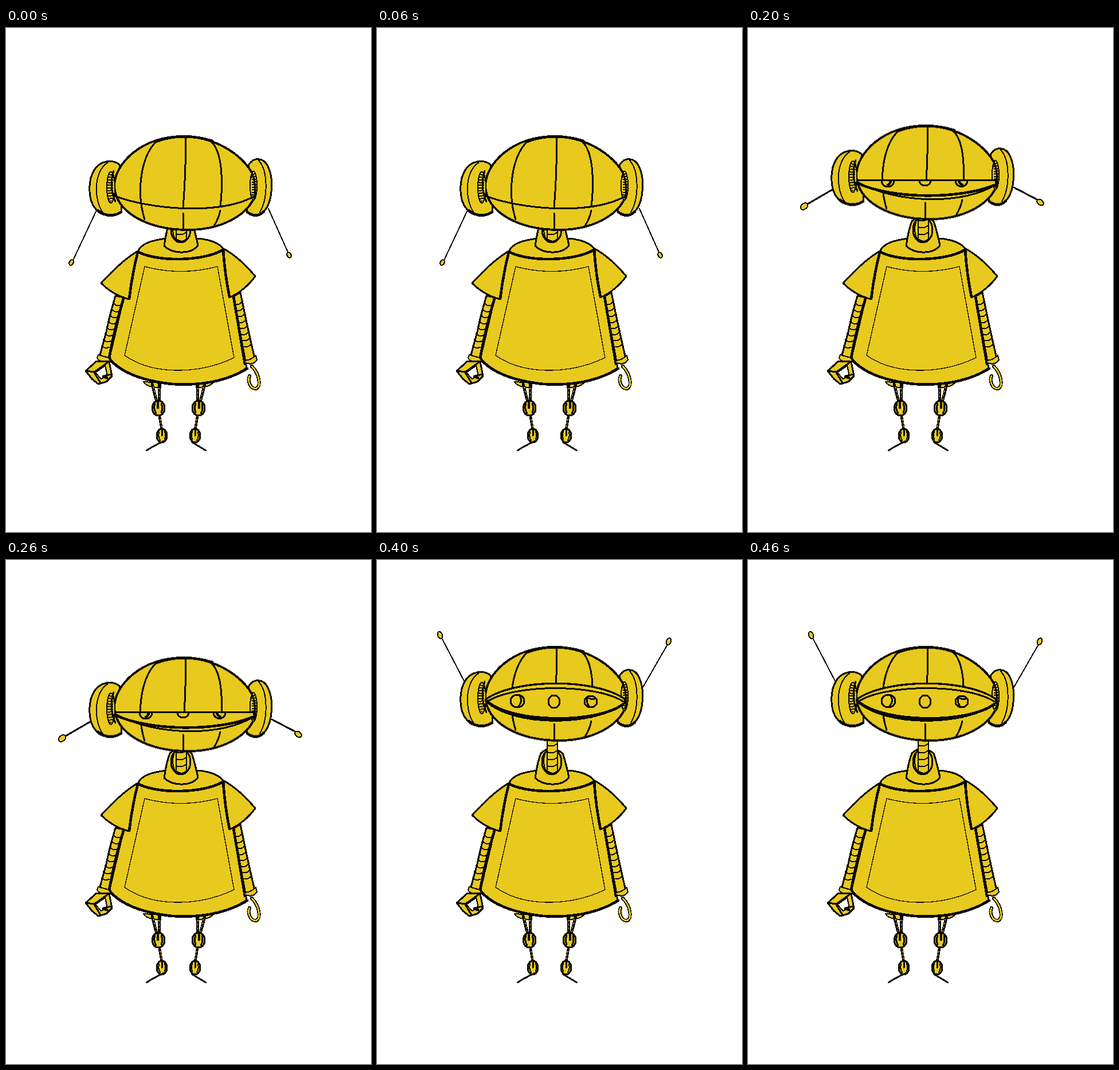
An HTML page for the animation above (500 ms loop, 637 px wide and 879 px high).

```html
<!DOCTYPE html>
<html lang="en">
<head>
<meta charset="utf-8">
<title>Robot</title>
<style>
  html, body { margin: 0; width: 100%; height: 100%; overflow: hidden; background: #fff; }
  svg { display: block; width: 100%; height: 100%; shape-rendering: crispEdges; }
  .ink { fill: none; stroke: #080802; stroke-width: 3; stroke-linecap: round; stroke-linejoin: round; }
  .y { fill: #e8c91e; }
  .w { fill: #fff; }
  .thin { stroke-width: 1.3; }
  .mid { stroke-width: 2; }
  .bold { stroke-width: 4.6; }
  .gold { stroke: #e8c91e; stroke-width: 1.2; }

  /* five held poses, 100 ms each */
  .head { animation: rise .5s steps(5) infinite; }
  @keyframes rise { to { transform: translateY(-46.5px); } }
  .pose { visibility: hidden; animation: show .5s step-end infinite; animation-delay: calc(var(--i) * .1s - .5s); }
  @keyframes show { 0% { visibility: visible; } 20%, 100% { visibility: hidden; } }
</style>
</head>
<body>
<svg viewBox="0 0 637 879">
  <defs>
    <g id="leg">
      <path class="y mid" d="M240 617q5 10 30 10v-8z"/>
      <path stroke-width="5" d="M255 621L263 652M267 621L268 652"/>
      <path class="gold" stroke-dasharray="2 5" d="M257 626L262 648M267 628L268 648"/>
      <ellipse class="y" cx="266" cy="663" rx="11" ry="13"/>
      <path d="M260 655q-3 9 2 17M271 655q3 8 0 16"/>
      <path class="bold" d="M265 652v10"/>
      <path stroke-width="4.5" d="M268 678L272 701"/>
      <path class="gold" stroke-dasharray="2 4" d="M269 682L272 698"/>
      <ellipse class="y" cx="272" cy="711" rx="9" ry="12"/>
      <path class="mid" d="M267 705q-2 8 2 14M277 704q2 7 0 13"/>
      <path d="M272 700v11"/>
    </g>
  </defs>

  <g class="ink">
    <!-- legs -->
    <use href="#leg"/>
    <use href="#leg" transform="translate(602) scale(-1 1)"/>
    <path d="M277 720Q262 726 245 737M324 722Q334 728 349 737"/>

    <!-- arms -->
    <path class="y" d="M191 467Q181 500 175 530L163 574L180 579L206 470Z"/>
    <path class="mid" d="M188 480q5 7 13 3m-16 7.5q5 7 13 3m-16 7.5q5 7 13 3m-16 7.5q5 7 13 3m-16 7.5q5 7 13 3m-16 7.5q5 7 13 3m-16 7.5q5 7 13 3m-16 7.5q5 7 13 3"/>
    <path class="y" d="M397 468L417 584L434 576Q422 525 409 461Z"/>
    <path class="mid" d="M400 482q7 2 12-5m-9.7 15.5q7 2 12-5m-9.7 15.5q7 2 12-5m-9.7 15.5q7 2 12-5m-9.7 15.5q7 2 12-5m-9.7 15.5q7 2 12-5m-9.7 15.5q7 2 12-5m-9.7 15.5q7 2 12-5"/>

    <!-- torso -->
    <path class="y" d="M230 390L205 472L180 578C202 604 245 616 290 621C340 624 385 616 420 593L397 468L380 386Z"/>
    <path class="bold" d="M205 472Q188 530 180 576C202 604 245 616 290 621C340 624 385 616 421 594M397 468Q410 545 417 586"/>
    <path class="thin" d="M242 416Q305 433 369 416L398 575C335 605 255 605 207 571Z"/>
    <path class="y" d="M230 389C206 403 186 423 166 445Q187 466 215 473Q219 430 230 389Z"/>
    <path class="y" d="M380 385C400 396 420 415 435 433Q418 457 390 470Q381 428 380 385Z"/>
    <path class="bold" d="M230 391Q221 425 215 472M379 387Q382 430 390 469"/>
    <path class="y" d="M230 390C236 375 256 370 280 367H334C358 369 373 376 380 386C345 408 262 408 230 390Z"/>
    <path class="bold" d="M230 390C262 408 345 408 380 386"/>

    <!-- hands -->
    <path class="y mid" d="M161 570q-5 9 6 11q12 3 15-1l-3-5z"/>
    <path class="y" d="M139 598L158 581L180 582L185 607L175 617L161 621L150 612Z"/>
    <path class="w mid" d="M156 601L173 589L177 606L166 612Z"/>
    <path d="M140 598L154 600L178 583M154 601L165 619M170 607L184 604"/>
    <path class="bold" d="M170 608L176 610"/>
    <path class="y mid" d="M416 583q14 7 22-4l-2-8q-8 8-19 9z"/>
    <path stroke-width="6" d="M429 590C441 602 447 625 436 629C426 629 421 615 425 607"/>
    <path class="gold" stroke-width="2.6" style="stroke-width:2.6" d="M429 590C441 602 447 625 436 629C426 629 421 615 425 607"/>

    <!-- neck -->
    <path class="y" d="M276 380Q280 352 286 337Q303 321 324 337Q330 355 335 379C323 395 291 395 276 380Z"/>
    <ellipse class="y" cx="305" cy="352" rx="17" ry="22"/>
    <path class="mid" d="M293 338Q288 355 296 370"/>
    <path class="y mid" d="M297 308V368Q306 375 315 369V308Z"/>
    <path class="mid" d="M297 323q9 4 18-3m-18 15q9 4 18-3m-18 15q9 4 18-3m-18 15q9 4 18-3m-18 15q9 4 18-3"/>

    <!-- head and ears -->
    <g class="head">
      <path class="y" d="M198 238C185 228 165 232 155 246C142 265 143 300 156 315C165 329 190 331 202 319Z"/>
      <path class="mid" d="M177 235C153 250 153 300 169 322"/>
      <path class="bold" d="M160 318Q180 334 201 321"/>
      <path class="y" d="M424 238C432 225 449 225 457 241C468 262 465 303 451 319C443 330 428 330 420 320Z"/>
      <path class="mid" d="M441 231C458 250 457 298 443 321"/>
      <path class="bold" d="M421 321Q437 333 450 320"/>
      <path class="y" stroke-width="3.8" d="M189 275C190 235 238 189 308 189C376 189 432 235 437 275C438 318 384 352 318 352C248 352 191 322 189 275Z"/>
      <path class="bold" d="M262 198Q308 181 360 197"/>
      <path d="M264 197C237 218 226 283 242 334M314 190Q313 270 309 312M309 323L310 350M358 198C378 216 379 270 374 312M374 318Q371 333 363 345"/>
      <ellipse class="y mid" cx="183" cy="278" rx="7" ry="27"/>
      <path stroke-width="10" stroke-linecap="butt" stroke-dasharray="2 2.6" d="M184 255Q180 278 185 302"/>
      <path d="M188 249Q179 275 191 303"/>
      <ellipse class="y mid" cx="432" cy="275" rx="6" ry="25"/>
      <path stroke-width="8" stroke-linecap="butt" stroke-dasharray="2 2.6" d="M431 254Q436 275 431 297"/>
      <path d="M428 250Q438 272 433 298"/>
    </g>

    <!-- mouth, eyes and antennae -->
    <g class="pose" style="--i:0">
      <path d="M190 293C250 316 375 328 436 292"/>
      <path class="mid" d="M157 320L117 405M458 315L492 391"/>
      <ellipse class="y mid" cx="114" cy="409" rx="3.5" ry="5" transform="rotate(25 114 409)"/>
      <ellipse class="y mid" cx="494" cy="396" rx="3.5" ry="5" transform="rotate(-25 494 396)"/>
    </g>
    <g class="pose" style="--i:1">
      <path class="y" d="M188 276C250 287 360 290 433 279V288C370 315 250 312 189 279Z"/>
      <path class="bold" d="M190 279C250 305 360 306 430 284"/>
      <path class="mid" d="M149 298L108 347M464 291Q484 314 502 342"/>
      <ellipse class="y mid" cx="104" cy="353" rx="4" ry="7.5" transform="rotate(36 104 353)"/>
      <ellipse class="y mid" cx="505" cy="347" rx="3.5" ry="6.5" transform="rotate(-28 505 347)"/>
    </g>
    <g class="pose" style="--i:2">
      <path class="y" d="M190 265H432V273C380 308 260 308 190 268Z"/>
      <path class="bold" d="M190 270C250 299 370 299 430 274"/>
      <path d="M233 266a10 10 0 0 0 22 0M299 266a10 9 0 0 0 20 0M362 266a10 10 0 0 0 21 0"/>
      <path class="bold" d="M249 266q0 5-5 8M368 267q1 4 6 7"/>
      <path d="M147 282L104 307M464 278L506 300"/>
      <ellipse class="y mid" cx="98" cy="311" rx="7" ry="5" transform="rotate(-40 98 311)"/>
      <ellipse class="y mid" cx="510" cy="304" rx="6.5" ry="4.5" transform="rotate(40 510 304)"/>
    </g>
    <g class="pose" style="--i:3">
      <path class="y" d="M190 263C240 240 380 236 433 264V266C380 297 250 297 190 264Z"/>
      <path d="M194 264C240 245 380 241 430 265"/>
      <path class="bold" d="M192 264C250 288 370 289 430 267"/>
      <path d="M239 250a11 10 0 1 0 14 0M304 250a10 10 0 1 0 12 0M368 250a10 10 0 1 0 12 0"/>
      <path d="M250 251q4 8-4 14M370 251q-2 8 5 14"/>
      <path class="mid" d="M145 245Q112 230 83 217M465 255Q490 238 518 228"/>
      <ellipse class="y mid" cx="77" cy="215" rx="6" ry="3.5" transform="rotate(12 77 215)"/>
      <ellipse class="y mid" cx="524" cy="225" rx="6" ry="4" transform="rotate(-25 524 225)"/>
    </g>
    <g class="pose" style="--i:4">
      <path class="y" stroke-width="3.4" d="M190 243C240 207 380 205 433 243V249C380 290 240 292 190 246Z"/>
      <path d="M194 246C240 217 380 215 430 247"/>
      <path class="bold" d="M192 246C235 285 385 286 430 251"/>
      <ellipse cx="245" cy="246" rx="12" ry="11"/>
      <ellipse cx="309" cy="247" rx="10" ry="11"/>
      <ellipse cx="373" cy="247" rx="11" ry="10"/>
      <path d="M249 237q6 9-2 18M368 239q-4 8 2 16M370 241q6 3 12 0"/>
      <path class="mid" d="M152 211L114 138M464 222L506 149"/>
      <ellipse class="y mid" cx="110" cy="131" rx="4" ry="6.5" transform="rotate(-20 110 131)"/>
      <ellipse class="y mid" cx="509" cy="142" rx="4" ry="6" transform="rotate(20 509 142)"/>
    </g>
  </g>
</svg>
</body>
</html>
```
